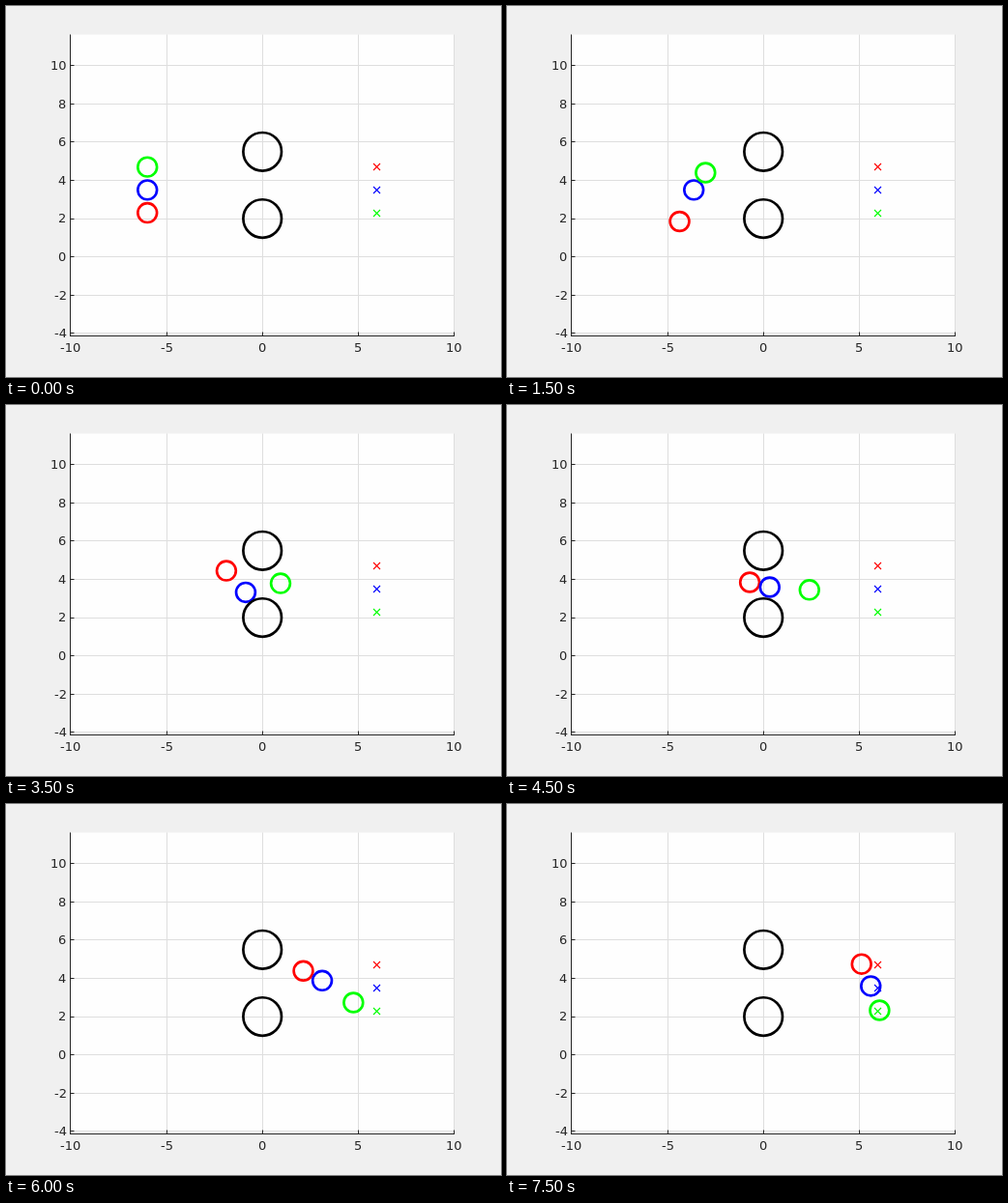
Write an HTML page with a canvas that moves like this. It is 512 px wide and 384 px high and loops after 8000 ms.

```html
<!DOCTYPE html>
<html>
<head>
<meta charset="utf-8">
<style>
html, body { margin: 0; width: 100%; height: 100%; overflow: hidden; background: #f0f0f0; }
canvas { display: block; }
</style>
</head>
<body>
<canvas id="plot" width="512" height="384"></canvas>
<script>
const ctx = document.getElementById('plot').getContext('2d');
const STEP = 500, STEPS = 16, UNIT = 19.8;
const X = v => 265.2 + v * 19.83;
const Y = v => 259.6 - v * 19.78;
const crisp = v => Math.floor(v) + 0.5;

// Turning points as [step, x, y] in axis units; straight travel between them.
const discs = [
  { color: '#f00', path: [
    [0, -6, 2.3], [1, -5.1, 2.4], [2, -5.1, 2.4], [3, -4.37, 1.85], [4, -4.27, 2.8], [5, -3.46, 3.4],
    [7, -1.88, 4.45], [8, -1.62, 3.8], [10, 0.2, 3.9], [11, 1.14, 4.27], [15, 5.12, 4.75]] },
  { color: '#00f', path: [
    [0, -6, 3.5], [3, -3.63, 3.5], [5, -2.3, 3], [7, -0.87, 3.32], [8, -0.6, 3.5],
    [12, 3.12, 3.88], [15, 5.6, 3.6]] },
  { color: '#0f0', path: [
    [0, -6, 4.7], [3, -3.02, 4.4], [8, 1.94, 3.64], [9, 2.4, 3.45], [13, 5.53, 2.5], [15, 6.06, 2.33]] }
];

function position(path, step) {
  const i = Math.max(1, path.findIndex(p => p[0] >= step));
  const [s0, x0, y0] = path[i - 1], [s1, x1, y1] = path[i];
  const k = (step - s0) / (s1 - s0);
  return [x0 + (x1 - x0) * k, y0 + (y1 - y0) * k];
}

function line(x1, y1, x2, y2, color, width = 1) {
  ctx.strokeStyle = color;
  ctx.lineWidth = width;
  ctx.beginPath();
  ctx.moveTo(x1, y1);
  ctx.lineTo(x2, y2);
  ctx.stroke();
}

function ring(x, y, r, color) {
  ctx.strokeStyle = color;
  ctx.lineWidth = 2.67;
  ctx.beginPath();
  ctx.arc(X(x), Y(y), r * UNIT, 0, Math.PI * 2);
  ctx.stroke();
}

// Each goal mirrors its disc's start through the middle of the gap.
function goal([, x, y], color) {
  const cx = crisp(X(-x) - 0.5), cy = crisp(Y(7 - y)), r = 3.5;
  line(cx - r, cy - r, cx + r, cy + r, color, 1.1);
  line(cx - r, cy + r, cx + r, cy - r, color, 1.1);
}

function label(text, right, baseline) {
  ctx.fillStyle = '#262626';
  ctx.fillText(text, Math.round(right - ctx.measureText(text).width), Math.round(baseline));
}

function axes() {
  const ink = '#262626', grid = '#dedede';
  const left = 66.5, right = 463.5, top = 29.5, bottom = 341.5;
  const ticks = (from, to, by, draw) => { for (let v = from; v <= to; v += by) draw(v); };

  ctx.fillStyle = '#f0f0f0';
  ctx.fillRect(0, 0, 512, 384);
  ctx.fillStyle = '#fefefe';
  ctx.fillRect(left, top, right - left, bottom - top);
  ticks(-10, 10, 5, v => line(crisp(X(v)), top, crisp(X(v)), bottom, grid));
  ticks(-4, 10, 2, v => line(left, crisp(Y(v)), right, crisp(Y(v)), grid));
  line(left, top, left, bottom + 0.5, ink);
  line(left, bottom, right + 0.5, bottom, ink);

  ctx.font = '13px "DejaVu Sans", sans-serif';
  ticks(-10, 10, 5, v => {
    line(crisp(X(v)), bottom, crisp(X(v)), bottom - 4, ink);
    label(v, X(v) + ctx.measureText(v).width / 2, 358);
  });
  ticks(-4, 10, 2, v => {
    line(left, crisp(Y(v)), left + 4, crisp(Y(v)), ink);
    label(v, 62.5, Y(v) + 4.4);
  });
}

function draw(time) {
  const step = Math.floor(time / STEP) % STEPS;
  axes();
  for (const { path, color } of discs) goal(path[0], color);
  for (const { path, color } of discs) ring(...position(path, step), 0.5, color);
  ring(0, 2, 1, '#000');
  ring(0, 5.5, 1, '#000');
}

let start;
function tick(now) {
  start ??= now;
  draw(now - start);
  requestAnimationFrame(tick);
}
draw(0);
requestAnimationFrame(tick);
</script>
</body>
</html>
```
